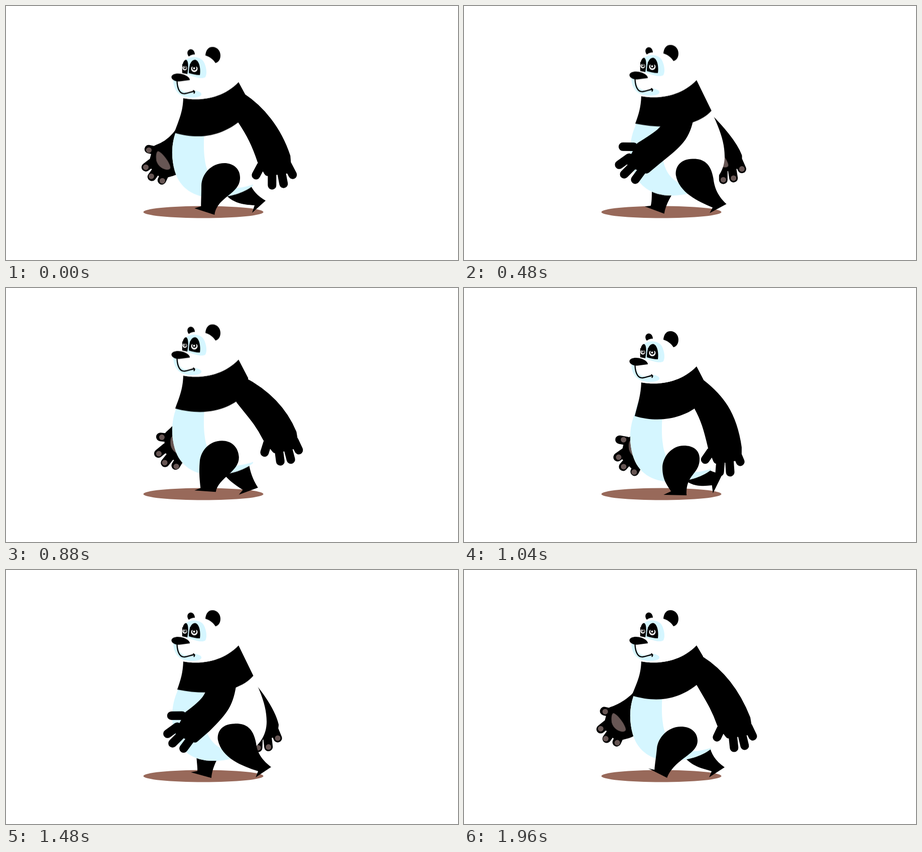
These frames come from a looping animation (900 px wide and 506 px high, 2 s). An HTML page without scripts:

```html
<!DOCTYPE html>
<html lang="en">
<head>
<meta charset="utf-8">
<title>Walking panda</title>
<style>
html, body { margin: 0; width: 100%; height: 100%; overflow: hidden; background: #fff; }
svg { display: block; width: 100vw; height: 100vh; }
.arm { stroke: #000; stroke-width: 17; stroke-linecap: round; stroke-linejoin: round; }
.pad { fill: #675654; }
.tips { fill: none; stroke: #675654; stroke-width: 11; stroke-linecap: round; }
.blue { fill: #d5f6ff; }
.white { fill: #fff; }
#bob, #band, #nearArm, #farArm, #nearLeg, #farLeg, #palm, #tips { animation: 2s linear infinite; }
#bob { animation-name: bob; }
#band { animation-name: band; }
#nearArm { animation-name: near-arm; }
#farArm { animation-name: far-arm; }
#nearLeg { animation-name: near-leg; }
#farLeg { animation-name: far-leg; }
#palm { animation-name: palm; }
#tips { animation-name: tips; }

/* one walk cycle is 48% of the loop, so most poses appear twice */
@keyframes bob {
  0%, 100% { transform: translateY(3.5px); }
  4%, 52% { transform: translateY(8px); }
  5.5%, 53.5% { transform: translateY(8px); }
  12%, 60% { transform: translateY(0); }
  16%, 64% { transform: translateY(-6px); }
  20%, 68% { transform: translateY(-5.5px); }
  26%, 74% { transform: translateY(2px); }
  28%, 76% { transform: translateY(8px); }
  29.5%, 77.5% { transform: translateY(8px); }
  36%, 84% { transform: translateY(0); }
  40%, 88% { transform: translateY(-6px); }
  44%, 92% { transform: translateY(-5.5px); }
  50%, 98% { transform: translateY(2px); }
}
@keyframes band {
  0%, 100% { d: path("M353,180C385,186 430,182 463,148L476,172L463,228C440,245 400,268 335,249C347,217 352,205 353,180Z"); }
  4%, 52% { d: path("M353,180C385,186 430,182 463,148L477,175L459,232C440,246 395,264 340,247C347,220 352,205 353,180Z"); }
  12%, 60% { d: path("M353,180C385,186 430,182 463,148L492,208L492,208C470,238 410,250 342,236C348,217 352,205 353,180Z"); }
  16%, 64% { d: path("M353,180C385,186 430,182 463,148L494,211L494,211C470,236 410,242 341,230C348,213 352,202 353,180Z"); }
  36%, 84% { d: path("M353,180C385,186 430,182 463,148L491,206L491,206C465,240 410,258 341,242C348,218 352,205 353,180Z"); }
  50%, 98% { d: path("M353,180C385,186 430,182 463,148L476,170L463,227C440,245 400,268 334,248C347,217 352,205 353,180Z"); }
}
@keyframes near-arm {
  0%, 100% { d: path("M470,182C505,205 540,245 558,300L560,325L522,330L509,308C498,275 488,255 468,225ZM508,318L498,337M530,330L530,357M548,328L553,354M560,315L571,336"); }
  4%, 52% { d: path("M472,190C508,218 535,250 545,318L545,335L505,342L495,318C486,280 480,260 466,235ZM492,326L481,342M512,340L510,367M529,340L531,367M542,325L551,346"); }
  12%, 60% { d: path("M463,215C465,240 470,268 450,300L445,345L395,340L400,297C425,262 423,260 423,235ZM388,308L366,311M385,330L366,349M400,345L378,368M425,345L405,369"); }
  16%, 64% { d: path("M448,220C445,262 435,272 400,310L380,332L350,318L368,284C400,258 405,248 407,225ZM355,285L334,286M345,308L326,322M355,322L336,341M372,332L358,351"); }
  22%, 70% { d: path("M448,215C440,255 420,265 375,295L350,315L320,303L338,270C380,248 395,245 407,220ZM325,271L303,270M316,292L296,306M325,306L306,325M342,317L328,336"); }
  28%, 76% { d: path("M452,225C449,270 440,290 410,325L388,345L358,332L376,298C408,270 410,255 412,235ZM363,299L342,300M353,322L334,336M363,336L344,355M380,346L366,365"); }
  36%, 84% { d: path("M482,205C502,245 503,275 503,320L497,345L462,345L455,310C456,265 452,260 449,232ZM458,335L454,350M465,342L455,356M480,345L475,373M496,335L497,365"); }
  45%, 93% { d: path("M468,182C515,203 555,235 578,285L583,308L546,318L527,297C508,265 492,250 468,222ZM528,306L522,325M552,317L557,344M570,313L578,338M583,300L593,318"); }
  50%, 98% { d: path("M470,179C508,203 540,240 562,296L566,320L528,327L512,306C500,272 488,255 469,222ZM512,316L504,333M535,327L538,354M553,325L559,350M566,312L575,331"); }
}
@keyframes far-arm {
  0%, 100% { d: path("M360,300C350,320 345,325 330,330L312,335L292,315L300,285C320,278 335,265 345,250ZM298,288L284,285M295,308L278,321M303,322L290,340M318,330L310,347"); }
  4%, 52% { d: path("M375,325C365,340 360,345 355,350L340,355L320,335L326,310C340,300 350,290 360,280ZM325,305L309,302M322,325L305,337M330,340L316,356M348,348L339,366"); }
  12%, 60% { d: path("M460,240C465,270 470,290 470,310L460,330L430,330L430,300C430,270 430,260 430,240ZM432,320L425,335M440,330L438,345M450,330L452,348M460,325L466,342"); }
  16%, 64% { d: path("M490,220C505,250 522,290 525,305L522,318L495,325L485,300C480,270 475,250 470,220ZM485,315L478,330M490,330L487,345M510,325L508,349M523,308L527,332"); }
  22%, 70% { d: path("M485,215C520,245 545,270 556,290L558,305L525,315L510,290C495,260 480,240 470,220ZM510,300L502,318M530,312L531,338M546,308L551,333M557,295L566,314"); }
  28%, 76% { d: path("M480,225C505,260 520,290 524,318L520,335L485,340L475,315C470,280 465,255 460,230ZM472,325L462,340M490,338L488,362M507,335L509,362M520,322L529,345"); }
  36% { d: path("M440,250C430,290 420,320 412,345L400,355L375,340L365,310C370,290 380,270 390,250ZM365,318L346,318M360,335L346,347M375,350L361,365M393,358L384,368"); }
  84% { d: path("M426,243C416,283 406,313 398,338L386,348L361,333L351,303C356,283 366,263 376,243ZM350,308L333,306M347,328L332,343M362,343L346,359M380,350L370,366"); }
  50%, 98% { d: path("M360,298C350,312 340,322 325,327L306,332L286,311L294,281C315,274 335,260 345,248ZM292,284L279,281M288,304L272,317M297,318L284,336M312,326L304,343"); }
}
@keyframes tips {
  0%, 100% { d: path("M284,287h.1M278,321h.1M289,339h.1M311,348h.1"); }
  4%, 52% { d: path("M317,302h.1M307,337h.1M317,356h.1M338,367h.1"); }
  12%, 60% { d: path("M425,335h.1M438,345h.1M452,348h.1M466,342h.1"); }
  16%, 64% { d: path("M478,330h.1M487,345h.1M507,349h.1M527,332h.1"); }
  22%, 70% { d: path("M502,318h.1M531,338h.1M551,333h.1M566,314h.1"); }
  28%, 76% { d: path("M462,340h.1M488,362h.1M509,362h.1M529,345h.1"); }
  36% { d: path("M350,318h.1M348,349h.1M362,364h.1M385,371h.1"); }
  84% { d: path("M342,306h.1M336,341h.1M347,358h.1M371,367h.1"); }
  50%, 98% { d: path("M281,282h.1M272,316h.1M282,336h.1M305,344h.1"); }
}
@keyframes palm {
  0%, 100% { transform: translate(0, 0); }
  4%, 52% { transform: translate(29px, 14px); }
  12%, 60% { transform: translate(125px, 0); }
  16%, 64% { transform: translate(170px, 0); }
  22%, 70% { transform: translate(212px, -12px); }
  28%, 76% { transform: translate(175px, 10px); }
  36%, 84% { transform: translate(75px, 20px); }
  50%, 98% { transform: translate(-5px, -4px); }
}
@keyframes near-leg {
  0%, 100% { d: path("M375,403L415,416C420,380 466,375 466,342C466,322 450,313 435,313C408,313 390,335 389,357C389,375 388,390 388,399Z"); }
  4%, 52% { d: path("M397,412L443,413C441,370 469,372 469,340C469,322 455,314 438,314C412,314 395,338 395,358C395,383 405,393 412,405Z"); }
  12%, 60% { d: path("M441,413L485,411C475,385 482,360 482,340C482,318 470,304 452,304C425,304 408,320 408,340C410,368 440,390 450,403Z"); }
  16%, 64% { d: path("M457,411L500,401C493,380 491,350 490,335C488,312 475,298 456,298C434,298 421,315 421,332C421,360 448,385 466,403Z"); }
  26%, 74% { d: path("M497,413L528,393C505,375 500,360 498,345C492,312 475,305 455,306C432,306 420,320 422,338C430,375 470,390 502,401Z"); }
  28%, 76% { d: path("M505,409L524,370C510,366 500,360 496,350C490,320 472,313 452,313C428,313 415,328 416,345C425,385 470,398 503,393Z"); }
  36%, 84% { d: path("M434,411L464,405C470,392 456,378 465,357C472,318 450,302 430,302C408,302 393,320 393,342C393,370 420,384 440,401Z"); }
  40%, 88% { d: path("M381,409L427,401C425,380 464,365 463,335C461,312 447,299 429,299C403,299 389,318 387,340C385,365 390,385 393,399Z"); }
  50%, 98% { d: path("M367,395L404,414C420,375 465,368 465,340C465,322 450,312 432,312C405,312 386,335 384,355C382,375 380,385 379,398Z"); }
}
@keyframes far-leg {
  0%, 100% { d: path("M490,412L517,388C500,378 492,368 486,355L430,365C445,392 470,396 495,397Z"); }
  4%, 52% { d: path("M496,409L515,370C505,369 496,367 488,362L430,370C445,395 470,396 494,393Z"); }
  12%, 60% { d: path("M441,413L485,411C480,390 470,380 450,360L395,360C405,388 425,395 449,401Z"); }
  16%, 64% { d: path("M375,410L421,402C414,388 412,372 412,355L365,345C366,370 378,388 386,399Z"); }
  25%, 73% { d: path("M358,398L396,415C400,395 415,375 425,360L375,350C375,375 374,390 370,398Z"); }
  28%, 76% { d: path("M387,412L433,413C431,380 440,370 440,350L385,350C386,385 396,395 402,405Z"); }
  36%, 84% { d: path("M430,414L468,411C464,395 478,385 484,362L420,360C425,385 432,392 441,402Z"); }
  40%, 88% { d: path("M447,411L490,401C484,380 482,365 480,350L420,350C425,370 445,390 457,403Z"); }
  50%, 98% { d: path("M488,413L519,393C500,380 492,365 489,350L432,362C448,390 470,394 493,401Z"); }
}
</style>
</head>
<body>
<svg viewBox="0 0 900 506">
  <defs>
    <path id="torso" d="M353,180C352,205 345,222 341,240C328,270 329,300 336,325C346,360 375,378 412,378C470,378 519,350 519,300C519,260 500,225 463,148Z"/>
    <clipPath id="inside"><use href="#torso"/></clipPath>
  </defs>
  <ellipse cx="393" cy="410.5" rx="119.5" ry="12" fill="#98695a"/>

  <path id="farArm" class="arm"/>
  <path id="palm" class="pad" d="M302,289C310,290 327,313 327,322C326,330 304,326 299,308C298,300 298,292 302,289Z"/>
  <path id="tips" class="tips"/>
  <path id="farLeg"/>

  <g id="bob">
    <use href="#torso" class="white"/>
    <path class="blue" clip-path="url(#inside)" d="M320,220H398C393,255 393,285 396,303C400,340 430,374 492,352V390H320Z"/>
    <path id="band"/>

    <!-- head -->
    <path class="white" d="M353,180C385,186 430,182 463,148C448,118 425,90 385,90C355,90 333,120 333,146C333,166 342,176 353,180Z"/>
    <path class="blue" d="M359,103C370,95 388,97 394,108C399,118 401,131 397,138C390,143 376,138 362,133C352,131 350,112 359,103Z"/>
    <path class="blue" d="M333,144C334,168 348,180 372,179C394,178 394,168 377,165C360,171 345,170 341,146Z"/>
    <path d="M397,95C398,84 403,78 411,78C421,78 427,86 427,95C427,104 422,109 417,110C413,103 405,97 397,95Z"/>
    <path d="M364,97C359,91 361,83 368,82.5C374,83 376,89 376,93C370,93 367,95 364,97Z"/>
    <path d="M351,130C350,117 352,105 358,103.500C363,104 364,117 361,132Z"/>
    <path d="M364,130C364,115 368,104 376,103.500C385,104 388,122 386,134C378,134 371,132 364,130Z"/>
    <circle class="white" cx="356" cy="120" r="4.500"/>
    <circle cx="356.500" cy="119.500" r="2.800"/>
    <circle class="white" cx="356" cy="119" r="1.200"/>
    <circle class="white" cx="375" cy="121.500" r="6.500"/>
    <circle cx="375" cy="120.500" r="4.300"/>
    <circle class="white" cx="374.500" cy="120.500" r="2"/>
    <path d="M351,112H362V116.500H351ZM366,112H384V117.500H366Z"/>
    <path d="M329.500,137C331,131 343,129 354,133C362,136 366,140 366,144C355,145 346,148 338,146C332,144 329,141 329.500,137Z"/>
    <path d="M340.500,145C341,163 347,172 356,171C364,170 368,167 375,166.500M373,165Q377,166 374.500,170" fill="none" stroke="#000" stroke-width="2.300" stroke-linecap="round"/>
  </g>

  <path id="nearLeg"/>
  <path id="nearArm" class="arm"/>
</svg>
</body>
</html>
```
